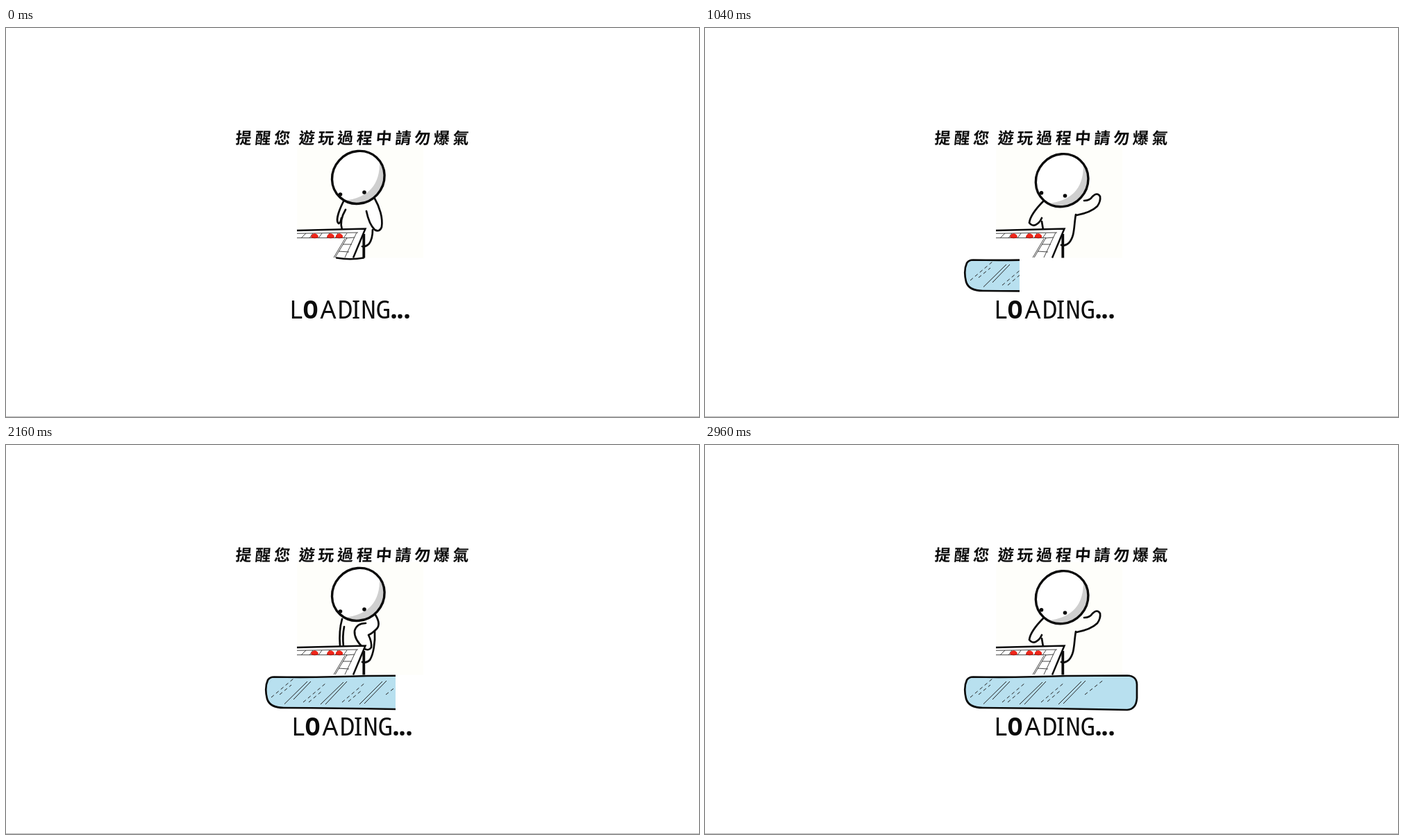
These frames come from a looping animation (998 px wide and 561 px high, 3040 ms). An HTML page without scripts:

```html
<!DOCTYPE html>
<html lang="zh-Hant">
<head>
<meta charset="utf-8">
<title>Loading</title>
<style>
html, body { margin: 0; width: 100%; height: 100%; overflow: hidden; background: #fff; }
svg { display: block; position: absolute; left: 0; top: 0; }
.ink { fill: none; stroke: #0b0b0b; stroke-width: 2.7; stroke-linecap: round; stroke-linejoin: round; }
.skin { fill: #fff; }
.thin { fill: none; stroke: #222; stroke-width: 1; }
.title { font: 600 23px "Noto Sans CJK TC", "Noto Sans CJK", sans-serif; letter-spacing: 4.75px; fill: #0b0b0b; }
.word { font: 500 36px "Noto Sans Mono", monospace; text-anchor: middle; fill: #0b0b0b; }
.word .wide { font-family: "Noto Sans", sans-serif; }
.word .slim { font-stretch: 80%; }
.word .bold { font-weight: 700; }

/* one loop is 38 steps of 80 ms */
.pose, .rest, .fly, .foot { animation: 3040ms step-end infinite; }
.pose, .fly, .foot { opacity: 0; }
.down { animation-name: down; }
.bend { animation-name: bend; }
.lift { animation-name: lift; }
.high { animation-name: high; }
.slam { animation-name: slam; }
.fold { animation-name: fold; }
.rest { animation-name: rest; }
.fly { animation-name: fly; }
.foot { animation-name: foot; }
@keyframes down { 0%, 63.15% { opacity: 1 } 7.89%, 71.05% { opacity: 0 } }
@keyframes bend { 0%, 13.15%, 76.31% { opacity: 0 } 7.89%, 71.05% { opacity: 1 } }
@keyframes lift { 0%, 21.05%, 84.21% { opacity: 0 } 13.15%, 76.31% { opacity: 1 } }
@keyframes high { 0%, 39.47% { opacity: 0 } 21.05%, 84.21%, 100% { opacity: 1 } }
@keyframes slam { 0%, 52.63% { opacity: 0 } 39.47% { opacity: 1 } }
@keyframes fold { 0%, 63.15% { opacity: 0 } 52.63% { opacity: 1 } }
@keyframes rest { 0%, 63.15% { opacity: 1 } 39.47% { opacity: 0 } }
@keyframes fly { 0%, 63.15% { opacity: 0 } 39.47% { opacity: 1 } }
@keyframes foot { 0% { opacity: 1 } 2.63% { opacity: 0 } }

.wave { animation: wave 3040ms linear infinite; }
@keyframes wave {
  0%, 23.68%, 63.15%, 86.84% { d: path("M550 245 Q558 243 562 236 Q568 230 572 236 Q574 244 567 256 Q558 266 534 269"); }
  34.21%, 39.47%, 97.36%, 100% { d: path("M546 249 Q554 249 558 243 Q565 236 569 243 Q570 250 565 257 Q556 266 535 270"); }
}

.p1 { animation: p1 3040ms linear infinite; }
.p2 { animation: p2 3040ms linear infinite; }
@keyframes p1 {
  0%, 39.47% { transform: translate(467px, 300px); }
  44.73% { transform: translate(438px, 259px) rotate(38deg); }
  52.63%, 100% { transform: translate(408px, 215px) rotate(90deg); opacity: 1; }
  52.64%, 99% { transform: translate(408px, 215px); opacity: 0; }
}
@keyframes p2 {
  0%, 39.47% { transform: translate(480px, 300px); }
  44.73% { transform: translate(454px, 258px) rotate(-36deg); }
  50% { transform: translate(454px, 217px) rotate(-10deg); }
  55.26% { transform: translate(460px, 203px) rotate(6deg); }
  60.52% { transform: translate(467px, 204px) rotate(14deg); }
  63.15%, 100% { transform: translate(470px, 212px) rotate(20deg); }
}

.slide { animation: slide 3040ms infinite; }
@keyframes slide {
  0% { transform: translateX(0); animation-timing-function: steps(4); }
  10.526% { transform: translateX(3px); animation-timing-function: steps(5); }
  23.684% { transform: translateX(6.5px); animation-timing-function: steps(4); }
  34.21% { transform: translateX(8px); animation-timing-function: steps(4); }
  44.736% { transform: translateX(7px); animation-timing-function: steps(6); }
  60.526% { transform: translateX(3px); animation-timing-function: steps(3); }
  68.421% { transform: translateX(2.3px); animation-timing-function: steps(4); }
  78.947% { transform: translateX(5.5px); animation-timing-function: steps(7); }
  97.368%, 100% { transform: translateX(8px); }
}

.bar { position: absolute; left: 370px; top: 326px; height: 62px; overflow: hidden; animation: load 3040ms infinite; }
@keyframes load {
  0% { width: 0; animation-timing-function: steps(2); }
  5.263% { width: 1px; animation-timing-function: steps(2); }
  10.526% { width: 16.5px; animation-timing-function: steps(5); }
  23.684% { width: 54.5px; animation-timing-function: steps(8); }
  44.736% { width: 111.5px; animation-timing-function: steps(6); }
  60.526% { width: 161px; animation-timing-function: steps(7); }
  78.947% { width: 214px; animation-timing-function: steps(5); }
  92.105%, 100% { width: 256px; }
}
</style>
</head>
<body>
<svg width="998" height="561" viewBox="0 0 998 561">
  <defs>
    <g id="head">
      <ellipse cx="507.3" cy="215.4" rx="39" ry="36.8" transform="rotate(-48 507.3 215.4)" fill="#fff"/>
      <path d="M538 191 Q540 243 487 249 Q513 258 533 241 Q548 226 545 203 Q543 196 538 191Z" fill="#cfcfcf"/>
      <ellipse class="ink" cx="507.3" cy="215.4" rx="39" ry="36.8" transform="rotate(-48 507.3 215.4)" style="stroke-width:3.4"/>
    </g>
    <circle id="eye" r="2.8" fill="#0b0b0b"/>
    <g id="piece">
      <path d="M-5 2.5 V0 Q-3 -3.6 0 -3.6 Q3 -3.6 5 0 V2.5 Q0 4 -5 2.5Z" fill="#b5140c"/>
      <path d="M-5 1 V0 Q-3 -3.6 0 -3.6 Q3 -3.6 5 0 V1 Q0 3 -5 1Z" fill="#f0261a"/>
    </g>
  </defs>

  <rect x="419.5" y="169" width="181.5" height="162.5" fill="#fefefa"/>
  <rect y="560" width="998" height="1" fill="#b9b9b9"/>
  <g class="title" transform="translate(0 167) skewX(-5)">
    <text x="330">提醒您</text>
    <text x="421">遊玩過程中請勿爆氣</text>
  </g>

  <g class="fly">
    <g class="p1"><use href="#piece"/></g>
    <g class="p2"><use href="#piece"/></g>
  </g>

  <g class="pose down">
    <g class="ink">
      <path d="M486 250 C480 262 474 278 479 282 Q482 281 483 274"/>
      <path d="M489 262 C483 272 481 282 484 291"/>
      <path d="M528 291 Q528 304 523 311 Q518 316 513 315"/>
      <path class="skin" d="M531 246 C538 258 543 274 541 287 Q538 295 531 291 C524 284 521 274 519 264"/>
    </g>
    <use href="#head"/>
    <use href="#eye" x="481.5" y="240"/><use href="#eye" x="516" y="237"/>
  </g>

  <g class="pose bend">
    <g class="ink">
      <path d="M484 251 C480 265 480 278 481 290 M487 262 C485 272 485 282 486 291"/>
      <path d="M531 268 C532 285 529 302 524 310 Q519 315 513 313"/>
      <path class="skin" d="M532 245 Q540 258 534 265 Q527 272 522 274 Q527 284 526 292 Q522 298 515 293 Q501 280 502 268 Q505 257 518 257"/>
    </g>
    <use href="#head"/>
    <use href="#eye" x="481.5" y="240"/><use href="#eye" x="516" y="237"/>
  </g>

  <g class="pose lift">
    <g class="ink">
      <path d="M485 251 C477 262 472 274 474 281 Q478 287 482 280"/>
      <path d="M488 261 C484 270 484 280 486 291"/>
      <path d="M531 272 C535 285 530 301 524 309 Q519 314 513 312"/>
      <path class="skin" d="M546 238 Q552 230 559 229 Q564 232 562 239 Q552 254 540 264 Q528 275 521 278 Q512 281 508 274 Q508 268 513 263"/>
    </g>
    <use href="#head" x="3" y="2"/>
    <use href="#eye" x="482.5" y="239.5"/><use href="#eye" x="517" y="239"/>
  </g>

  <g class="pose high">
    <g class="ink">
      <path d="M488 249 C478 259 468 272 467 281 Q471 286 476 284 Q482 281 485 274"/>
      <path d="M485 279 L487 291"/>
      <path d="M534 269 C531 285 533 300 524 310 Q518 315 513 313"/>
      <path class="wave" d="M550 245 Q558 243 562 236 Q568 230 572 236 Q574 244 567 256 Q558 266 534 269"/>
    </g>
    <use href="#head" x="6.8" y="4.3"/>
    <use href="#eye" x="484.5" y="237.7"/><use href="#eye" x="518.5" y="242"/>
  </g>

  <g class="pose slam">
    <g class="ink">
      <path d="M480 274 L482 290 M486 278 L487 291"/>
      <path d="M533 253 C534 275 535 297 526 311 Q520 316 513 313"/>
      <path class="skin" d="M534 246 Q533 262 520 271 Q508 279 496 277 Q474 271 470 259 Q472 250 480 252 Q487 258 497 262"/>
    </g>
    <use href="#head" x="-1.5"/>
    <use href="#eye" x="482" y="243"/><use href="#eye" x="516" y="236.5"/>
  </g>

  <g class="pose fold">
    <g class="ink">
      <path d="M481 262 C477 272 475 280 480 282 M485 269 Q482 280 484 291"/>
      <path d="M529 248 Q539 258 539 271"/>
      <path d="M532 290 Q530 304 524 311 Q518 316 513 315"/>
      <path class="skin" d="M484 249 Q475 249 478 258 Q484 266 500 274 Q520 285 532 289 Q542 290 541 280 Q535 271 526 265 Q505 261 488 252"/>
    </g>
    <use href="#head"/>
    <use href="#eye" x="481.5" y="240"/><use href="#eye" x="516" y="237"/>
  </g>

  <path d="M419 292 L517.5 289.5 L500 331.5 H419Z" fill="#fff"/>
  <g class="thin" style="stroke:#333;stroke-width:.9">
    <path d="M419 296.3 L507 295 M419 302.7 H491 L474 331 M488 304 L472 331 M505 295 L488 331"/>
    <path d="M432 296 l-7 7 M442 296 l-5 7 M455 296 l-5 7 M466 296 l-4 7 M478 296 l-4 7 M491 296 l-5 7"/>
    <path d="M490 303 L502 302 M485 312 L498 312 M479 322 L494 323"/>
  </g>
  <path d="M419 292 L517.5 289.5 L500 331.5" fill="none" stroke="#0b0b0b" stroke-width="2.5"/>
  <path d="M515.3 297 V331.5" stroke="#0b0b0b" stroke-width="3.8"/>
  <path class="ink foot" d="M476 331.5 Q496 335 515 331.5" style="stroke-width:2.4"/>
  <use href="#piece" x="444.5" y="300"/>
  <g class="rest">
    <use href="#piece" x="467.5" y="300"/>
    <use href="#piece" x="480" y="300"/>
  </g>

  <g class="slide">
    <text class="word" y="419" x="418.5 438.5 464 488.5 504 522 543.5 558.5 567.5 577.5"><tspan class="slim">L</tspan><tspan class="slim bold">O</tspan><tspan class="wide">A</tspan><tspan class="slim">D</tspan><tspan class="wide">I</tspan>N<tspan class="slim">G</tspan><tspan class="slim bold">...</tspan></text>
  </g>
</svg>

<div class="bar">
  <svg width="256" height="62" viewBox="370 326 256 62">
    <path class="ink" d="M386 334.5 Q450 335.5 520 333 L608 332.5 Q621.5 333 622 345 V365 Q621 381 608 382 Q500 379.5 400 379 Q380 379 376 366 Q372 350 377 339 Q380 334.5 386 334.5Z" style="fill:#b8e0ef"/>
    <path class="thin" d="M401 373.5 L434 341 M414 367 L439 341 M453 374 L486 342 M460 374 L491 341 M509 374 L542 341 M516 373 L548 340"/>
    <path class="thin" stroke-dasharray="5 4" d="M382 364 L414 337 M394 360 L411 346 M428 371 L460 344 M436 371 L456 354 M484 371 L517 343 M493 370 L512 354 M547 360 L575 338"/>
  </svg>
</div>
</body>
</html>
```
